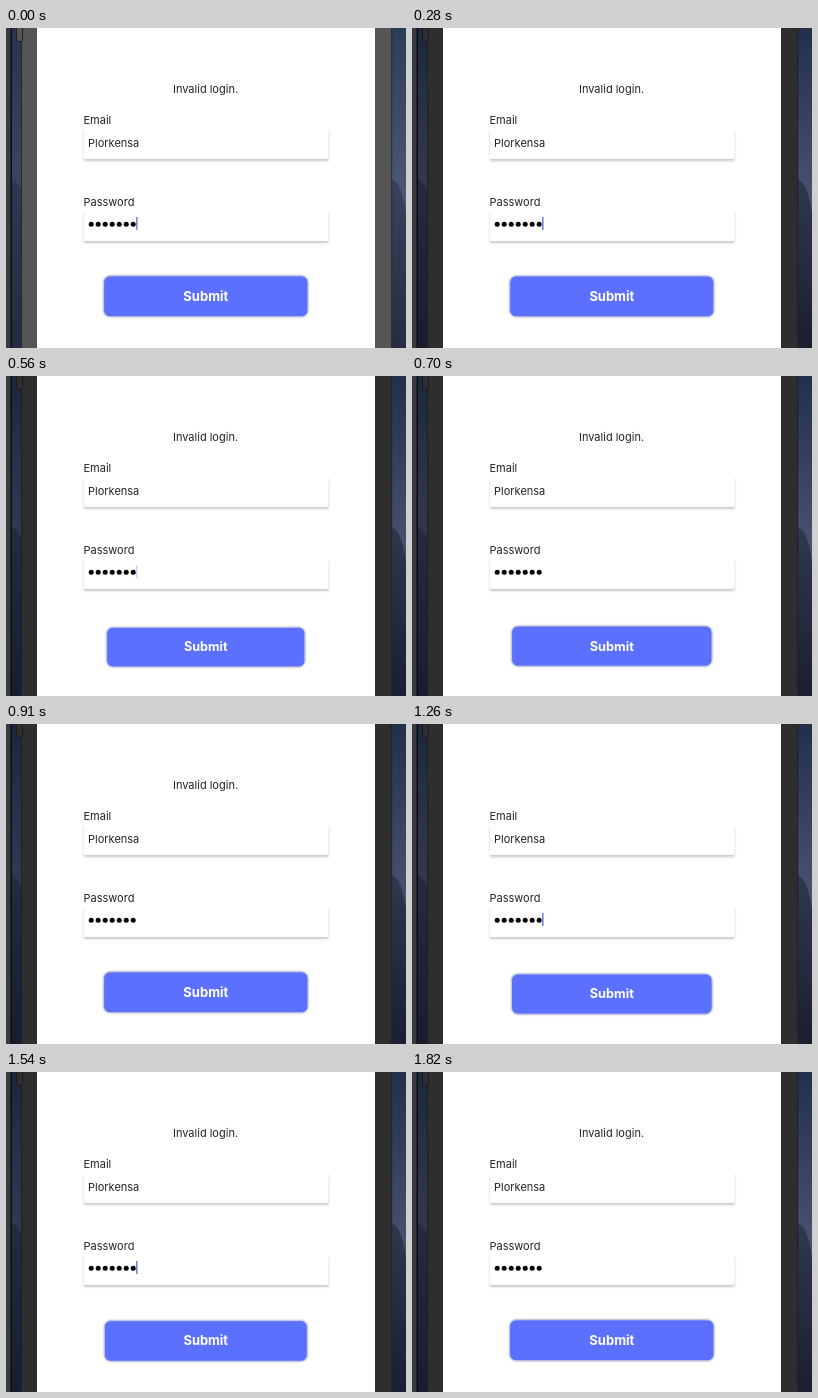
An HTML page for the animation above (1.89 s loop, 400 px wide and 320 px high).

```html
<!DOCTYPE html>
<html lang="en">
<head>
<meta charset="utf-8">
<title>Login form</title>
<style>
  html, body { margin: 0; width: 100%; height: 100%; overflow: hidden; background: #2e2e2e; }
  svg { display: block; width: 400px; height: 320px; }
  text { font: 11px Inter, "Open Sans", sans-serif; fill: #232325; }
  .field { fill: #fff; filter: drop-shadow(0 2px 1px rgba(0, 0, 0, .22)); }
  .button { fill: #5c70ff; stroke: #c8cbdc; stroke-width: 1; filter: drop-shadow(0 .5px 1px rgba(0, 0, 0, .22)); }
  .button + text { font-size: 13px; font-weight: 700; fill: #fff; }
</style>
</head>
<body>
<svg viewBox="0 0 400 320">
  <defs>
    <linearGradient id="sky" x1="0" y1="0" x2="0" y2="1">
      <stop offset="0" stop-color="#223049"/>
      <stop offset=".5" stop-color="#46506c"/>
      <stop offset=".6" stop-color="#464f6a"/>
      <stop offset="1" stop-color="#2a3048"/>
    </linearGradient>
    <linearGradient id="hill" x1="0" y1="0" x2="0" y2="1">
      <stop offset="0" stop-color="#30384f"/>
      <stop offset="1" stop-color="#1a1f31"/>
    </linearGradient>
  </defs>
  <rect width="400" height="320" fill="url(#sky)"/>
  <path d="M386 151Q396 155 400 186V320H386zM6 151Q12 154 16 164V320H6z" fill="url(#hill)"/>
  <rect x="6" width="10" height="320" fill="#141b2c" opacity=".4"/>
  <rect id="glow" x="5" width="395" height="320" fill="#6c7fa6"/>
  <rect width="5" height="320" fill="#3a3b3e"/>
  <rect x="4.5" width="1.5" height="320" fill="#0b0d12"/>
  <g id="bezel">
    <rect x="15" width="371" height="320"/>
    <rect x="10.5" y="-4" width="6" height="17.5" rx="1.5" stroke="#17191d" stroke-width=".8"/>
  </g>
  <path d="M15.5 14V320M385.7 0V320" stroke="#1c1e22" stroke-width=".8"/>
  <rect x="31" width="338" height="320" fill="#fff"/>

  <text id="message" x="199.5" y="65" text-anchor="middle">Invalid login.</text>
  <text x="77.5" y="95.5">Email</text>
  <rect class="field" x="78" y="100" width="244.5" height="31" rx="1.5"/>
  <text x="82" y="118.5">Plorkensa</text>
  <text x="77.5" y="177.5">Password</text>
  <rect class="field" x="78" y="182" width="244.5" height="31" rx="1.5"/>
  <g id="dots"></g>
  <rect id="caret" x="130.2" y="189" width="1.3" height="13" fill="#5068d8"/>

  <g id="submit">
    <rect class="button" x="-102.2" y="-20.5" width="204.4" height="41" rx="6.5"/>
    <text y="4.5" text-anchor="middle">Submit</text>
  </g>
</svg>
<script>
  const STEP = 70, LOOP = 1890;
  const REPLY = 210;   // the message returns this long after it clears
  const BLINK = 1050;
  const taps = [
    { down: 260, up: 560, clear: 350 },
    { down: 1145, up: 1300, clear: 1190 }
  ];

  const el = id => document.getElementById(id);
  const set = (id, name, value) => el(id).setAttribute(name, value);
  const clamp = v => Math.min(1, Math.max(0, v));
  const smooth = v => (v = clamp(v), v * v * (3 - 2 * v));

  const pressed = (t, { down, up }) =>
    smooth((t - down) / 200) * (1 - smooth((t - up) / 350));
  const waiting = (t, { clear }) => t >= clear && t < clear + REPLY;
  const caret = t => clamp(1 + 3.4 * Math.cos(2 * Math.PI * (t - 265) / BLINK));

  for (let i = 0; i < 7; i++) {
    const dot = document.createElementNS("http://www.w3.org/2000/svg", "circle");
    dot.setAttribute("cx", 85.2 + i * 7);
    dot.setAttribute("cy", 196.3);
    dot.setAttribute("r", 2.5);
    el("dots").append(dot);
  }

  function draw(now) {
    const t = Math.floor(now % LOOP / STEP) * STEP;
    const p = Math.max(...taps.map(tap => pressed(t, tap)));
    const lit = t < STEP;
    set("bezel", "fill", lit ? "#555" : "#2e2e2e");
    set("glow", "opacity", lit ? .15 : 0);
    set("message", "opacity", taps.some(tap => waiting(t, tap)) ? 0 : 1);
    set("caret", "opacity", caret(t));
    set("submit", "transform", `translate(199.8 ${268.3 + 2.8 * p}) scale(${1 - .03 * p})`);
  }

  const start = performance.now();
  function tick() {
    draw(performance.now() - start);
    requestAnimationFrame(tick);
  }
  tick();
</script>
</body>
</html>
```
